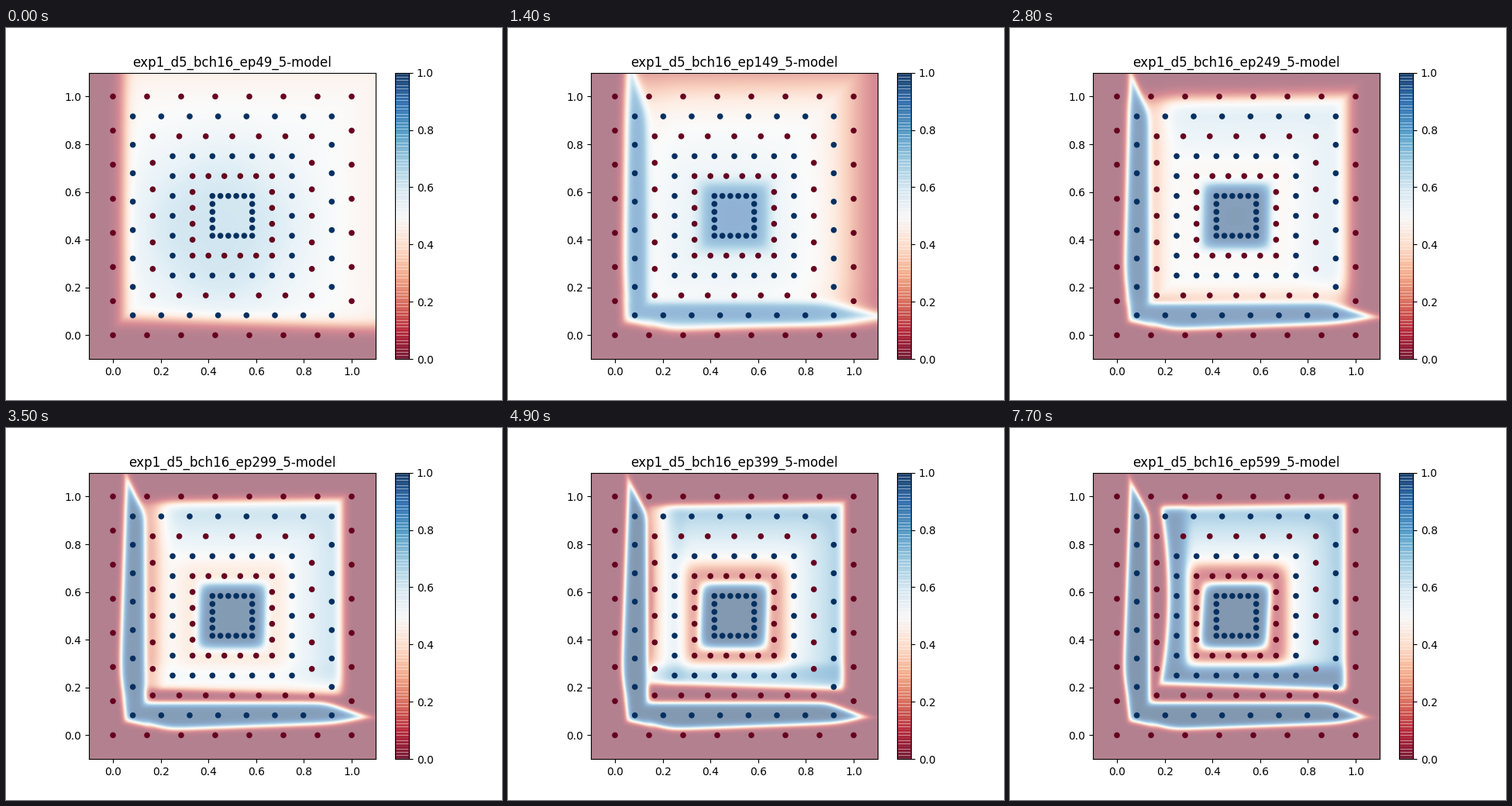
Animation of 640x480 px, one loop 8 s. Source, as a matplotlib script:

```python
import numpy as np
import matplotlib.pyplot as plt
from matplotlib.animation import FuncAnimation

STEP_MS, TICK_MS, LOOP_MS = 700, 100, 8000
CX, CY = 292.0, 242.4            # centre of the plot in stage pixels
LEFT, TOP, SIZE = 107.2, 57.6, 369.6
N = 370

plt.rcParams["text.kerning_factor"] = 6
ticks = (np.arange(N) + 0.5) / N * SIZE
X, Y = np.meshgrid(LEFT + ticks, TOP + ticks)
R = (np.abs(X - CX) ** 8 + np.abs(Y - CY) ** 8) ** (1 / 8)


def soft(d, w):
    return 1 / (1 + np.exp(-np.clip(d / w, -40, 40)))


def ramp(k, start, end):
    t = np.clip((k - start) / (end - start), 0, 1)
    return t * t * (3 - 2 * t)


def meet(*ds, s=2):
    """Intersection of distances with rounded corners."""
    return -s * np.logaddexp.reduce([-d / s for d in ds])


def hull(*pts, s=2):
    """Distance inside a convex outline given clockwise."""
    planes = []
    for (ax, ay), (bx, by) in zip(pts, pts[1:] + pts[:1]):
        ex, ey = bx - ax, by - ay
        planes.append((ex * (Y - ay) - ey * (X - ax)) / np.hypot(ex, ey))
    return meet(*planes, s=s)


def over(p, value, mask):
    return p + (value - p) * mask


def field(k):
    """Predicted class after k training steps, 0 red to 1 blue."""
    early = np.exp(-0.55 * k)
    learned = 1 - np.exp(-0.75 * k)
    rise = ramp(k, 2.5, 8.5)

    # Square rings: a red trough around the core, bluer further out.
    floor = 0.5 - 0.42 * rise
    p = over(floor, 0.52, soft(R - 66, 12 - 8 * rise))
    p = p + 0.25 * np.sqrt(rise) * np.clip((R - 70) / 60, 0, 1)
    glow = np.hypot(X - CX + 15, Y - CY - 15) / 110
    p = p + 0.17 * early * np.exp(-glow ** 3)

    # Gap beside the outer band, then the blue strips inside it.
    p = p * (1 - ramp(k, 1, 7) * soft(np.maximum(200 - X, Y - 338), 7))
    p = over(p, 0.97, ramp(k, 5, 11.5) * soft(228 - X, 3.5))
    p = over(p, 0.97, ramp(k, 4, 10) * soft(Y - 307, 3.5))

    # Red outside the middle square.
    left = 153 + ramp(k, 4, 9) * (52 - 10 * ((Y - 215) / 115) ** 2)
    bottom = 379 - 46 * ramp(k, 2, 6) + 0.035 * (X - CX)
    top = 102 - 95 * early + 0.015 * (CX - X)
    right = 432 + 100 * early ** 2
    p = p * soft(meet(X - left, bottom - Y), 2.2 + 3 * early)
    p = p * soft(meet(Y - top, right - X), 2.4 + 31 * np.exp(-k * k / 7))

    # L-shaped band whose two tips draw back.
    upright = hull((156, 72 - 100 * early), (179, 112), (180, 380),
                   (157, 376), (147 + 12 * early, 318))
    flat = hull((157, 355), (412, 355), (456 + 100 * early, 373),
                (428, 381), (210, 389), (157, 375))
    band = np.logaddexp(upright / 3, flat / 3) * 3
    p = over(p, 1, learned * soft(band, 1.8 + 4 * early))

    skew = 0.45 * k
    core = hull((250, 201), (336, 201), (336 - skew, 285), (250 - skew, 285), s=5)
    return over(p, 1, learned * soft(core, 2.4 + 10 * early))


fields = [field(k) for k in range(-(-LOOP_MS // STEP_MS))]

fig = plt.figure(figsize=(6.4, 4.8), dpi=100)
ax = fig.add_axes([LEFT / 640, 52.8 / 480, SIZE / 640, SIZE / 480])
cax = fig.add_axes([501.6 / 640, 52.8 / 480, SIZE / 20 / 640, SIZE / 480])
image = ax.imshow(fields[0], cmap="RdBu", vmin=0, vmax=1, alpha=0.5,
                  extent=(-0.1, 1.1, -0.1, 1.1), interpolation="bilinear")
bar = fig.colorbar(image, cax=cax, boundaries=np.linspace(0, 1, 101),
                   ticks=np.linspace(0, 1, 6), format="%.1f")
bar.solids.set_edgecolor("face")

# Six nested squares of samples with alternating class.
dots = []
for i, count in enumerate((8, 8, 7, 7, 6, 6)):
    lo, hi = i / 12, 1 - i / 12
    for s in np.linspace(lo, hi, count):
        dots += [(s, lo, i % 2), (s, hi, i % 2), (lo, s, i % 2), (hi, s, i % 2)]
px, py, label = np.array(sorted(set(dots))).T
ax.scatter(px, py, s=20, c=label, cmap="RdBu")

ax.set(xlim=(-0.1, 1.1), ylim=(-0.1, 1.1),
       xticks=np.linspace(0, 1, 6), yticks=np.linspace(0, 1, 6))
title = ax.set_title("")


def draw(frame):
    k = frame * TICK_MS // STEP_MS
    image.set_data(fields[k])
    title.set_text(f"exp1_d5_bch16_ep{50 * k + 49}_5-model")
    return image, title


anim = FuncAnimation(fig, draw, frames=LOOP_MS // TICK_MS, interval=TICK_MS,
                     repeat=True, repeat_delay=0)
plt.show()
```
